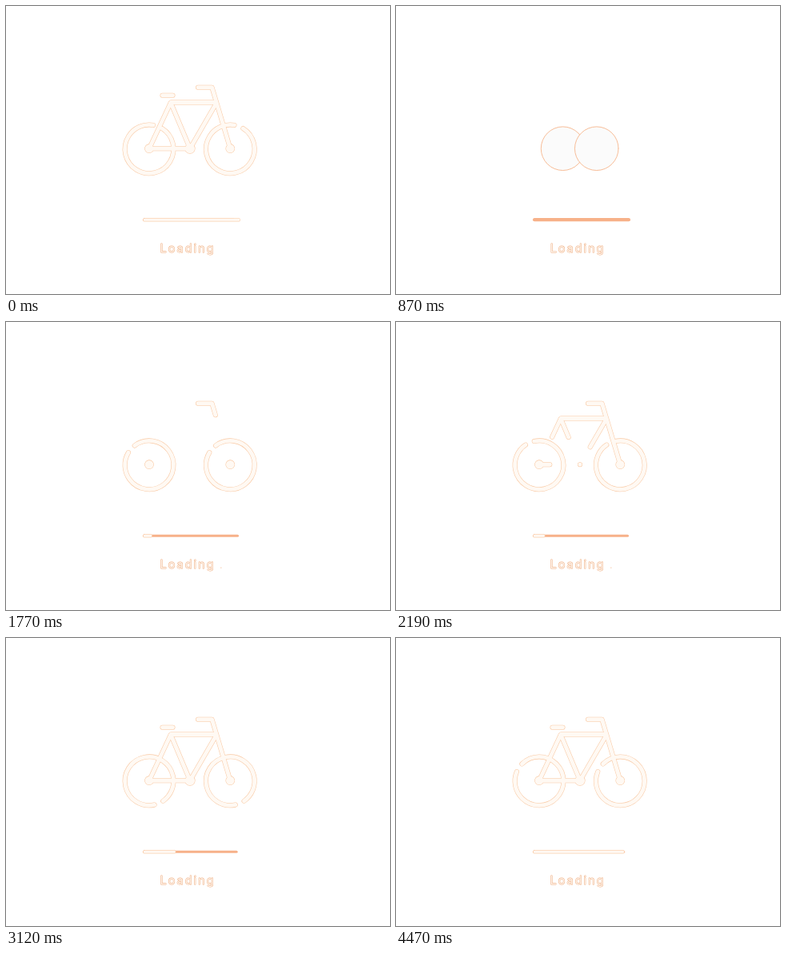
Write an HTML page with a canvas that moves like this. It is 480x360 px and loops after 4.5 s.

```html
<!DOCTYPE html>
<html lang="en">
<head>
<meta charset="utf-8">
<title>Loading</title>
<style>
  html, body { margin: 0; width: 100%; height: 100%; overflow: hidden; background: #fff; }
  canvas { display: block; width: 480px; height: 360px; }
</style>
</head>
<body>
<canvas id="stage" width="480" height="360"></canvas>
<script>
const ctx = document.getElementById('stage').getContext('2d');
const LOOP = 4500;
const PALE = '#fff9f3', DISC = '#fbfbfb', EDGE = '#f9c8a2', ORANGE = '#f7b189';
const REAR = 179, FRONT = 280.3, AXLE = 178.2, MIDDLE = 230;
const WHEEL = 30.4, HUB = 5.3, TUBE = 4.9;
const GAP = 11 * Math.PI / 180;

const clamp = v => Math.max(0, Math.min(1, v));
const phase = (t, from, to) => clamp((t - from) / (to - from));
const mix = (a, b, k) => a + (b - a) * k;
const easeOut = k => 1 - (1 - k) ** 3;
const easeInOut = k => k * k * (3 - 2 * k);

// Tubes of the bike: points and drawing interval
const TUBES = [
  { points: [[240, 101.8], [257.5, 101.8], [FRONT, AXLE]], from: 1590, to: 2130 },
  { points: [[262, 120.5], [206, 120.5], [REAR, AXLE]], from: 1850, to: 2350 },
  { points: [[262, 123], [MIDDLE, AXLE]], from: 1950, to: 2350 },
  { points: [[206, 121], [MIDDLE, AXLE]], from: 2050, to: 2400 },
  { points: [[REAR, AXLE], [MIDDLE, AXLE]], from: 2100, to: 2450 }
];

function partialPath(points, share) {
  const path = new Path2D();
  const lengths = points.slice(1).map((p, i) => Math.hypot(p[0] - points[i][0], p[1] - points[i][1]));
  let left = share * lengths.reduce((a, b) => a + b, 0);
  path.moveTo(...points[0]);
  for (let i = 0; i < lengths.length && left > 0; i++) {
    const k = Math.min(1, left / lengths[i]);
    path.lineTo(mix(points[i][0], points[i + 1][0], k), mix(points[i][1], points[i + 1][1], k));
    left -= lengths[i];
  }
  return path;
}

function circle(x, y, r) {
  const path = new Path2D();
  path.arc(x, y, r, 0, Math.PI * 2);
  return path;
}

function disc(x, y, r) {
  if (r <= 0) return;
  const path = circle(x, y, r);
  ctx.fillStyle = DISC;
  ctx.fill(path);
  ctx.strokeStyle = '#f5ad7e';
  ctx.lineWidth = 0.8;
  ctx.stroke(path);
}

function drawBike(t, spin) {
  const lines = [], dots = [];
  const rim = easeInOut(phase(t, 1400, 1700));
  if (rim > 0) {
    const start = (-138 + spin) * Math.PI / 180 + GAP;
    for (const x of [REAR, FRONT]) {
      const arc = new Path2D();
      arc.arc(x, AXLE + 0.6, WHEEL, start, start + (Math.PI * 2 - 2 * GAP) * rim);
      lines.push(arc);
    }
  }
  for (const tube of TUBES) {
    const share = phase(t, tube.from, tube.to);
    if (share > 0) lines.push(partialPath(tube.points, share));
  }
  const seat = easeOut(phase(t, 2350, 2800));
  if (seat > 0) {
    const tilt = 12 * (1 - seat);
    lines.push(partialPath([[195.5, 111.8 - tilt], [208.5, 111.8 + tilt / 2]], seat));
  }
  if (t > 1450) dots.push(circle(REAR, AXLE, HUB), circle(FRONT, AXLE, HUB));
  const crank = easeOut(phase(t, 2150, 2400));
  if (crank > 0) dots.push(circle(MIDDLE, AXLE, 6 * crank));

  // Edge first, then fill, so that joints merge
  for (const [color, extra] of [[EDGE, 1.1], [PALE, 0]]) {
    ctx.strokeStyle = ctx.fillStyle = color;
    for (const line of lines) {
      ctx.lineWidth = TUBE + extra;
      ctx.stroke(line);
    }
    for (const dot of dots) {
      ctx.fill(dot);
      if (extra) {
        ctx.lineWidth = extra;
        ctx.stroke(dot);
      }
    }
  }
}

function drawDiscs(t) {
  if (t >= 1450) return;
  const rise = easeInOut(phase(t, 300, 700));
  const split = easeInOut(phase(t, 720, 1060));
  const grow = easeOut(phase(t, 220, 510));
  const r = mix(27.3 * grow, HUB, easeInOut(phase(t, 900, 1560)));
  const y = mix(272, AXLE, rise);
  disc(mix(MIDDLE - 0.3, REAR, split), y, r);
  if (split > 0) disc(mix(MIDDLE - 0.3, FRONT, split), y, r);
}

function drawBar(t, roll) {
  const width = easeOut(phase(t, 30, 400));
  const thin = phase(t, 1260, 1700);
  const shrink = phase(t, 1260, 1700) * 2 + phase(t, 2600, LOOP) * 5;
  const left = mix(232, 171, width);
  const right = mix(232, 293 - shrink, width);
  const height = mix(4.2, 3, thin);
  ctx.fillStyle = ORANGE;
  ctx.beginPath();
  ctx.roundRect(left, 267.2 - height / 2, right - left, height, height / 2);
  ctx.fill();

  const done = Math.min(121, 11 * phase(t, 1150, 1770) + 17.2 * roll);
  if (done <= 0) return;
  ctx.beginPath();
  ctx.roundRect(171.5, 265.4, done, 3.8, 1.2);
  ctx.fillStyle = PALE;
  ctx.fill();
  ctx.strokeStyle = EDGE;
  ctx.lineWidth = 0.6;
  ctx.stroke();
}

function drawLabel(t) {
  const size = easeOut(phase(t, 490, 950));
  if (size <= 0) return;
  ctx.save();
  ctx.translate(227, 302);
  ctx.scale(size, size);
  ctx.translate(-227, -302);
  ctx.font = '400 14.5px Inter, sans-serif';
  ctx.letterSpacing = '2px';
  ctx.textAlign = 'left';
  ctx.strokeStyle = '#efa878';
  ctx.lineWidth = 0.9;
  ctx.strokeText('Loading', 192.5, 308);
  ctx.fillStyle = '#fdf3ea';
  ctx.fillText('Loading', 192.5, 308);
  ctx.fillStyle = '#f9dcc6';
  if (t > 1100 && t < 1500) ctx.fillRect(263, 306.5, 1.5, 1.5);
  if (t > 1200 && t < 3000) ctx.fillRect(268, 306.5, 1.5, 1.5);
  ctx.restore();
}

function draw(now) {
  const clock = now % LOOP;
  // The finished pose opens each loop
  const t = clock < 30 ? LOOP + 130 : clock;
  const roll = Math.max(0, (t - 1770) / 1000) ** 1.8;
  ctx.clearRect(0, 0, 480, 360);
  ctx.lineCap = ctx.lineJoin = 'round';
  drawBar(t, roll);
  drawDiscs(t);
  drawBike(t, 119 * roll);
  drawLabel(t);
}

const began = performance.now();
function tick() {
  draw(performance.now() - began);
  requestAnimationFrame(tick);
}
tick();
</script>
</body>
</html>
```
